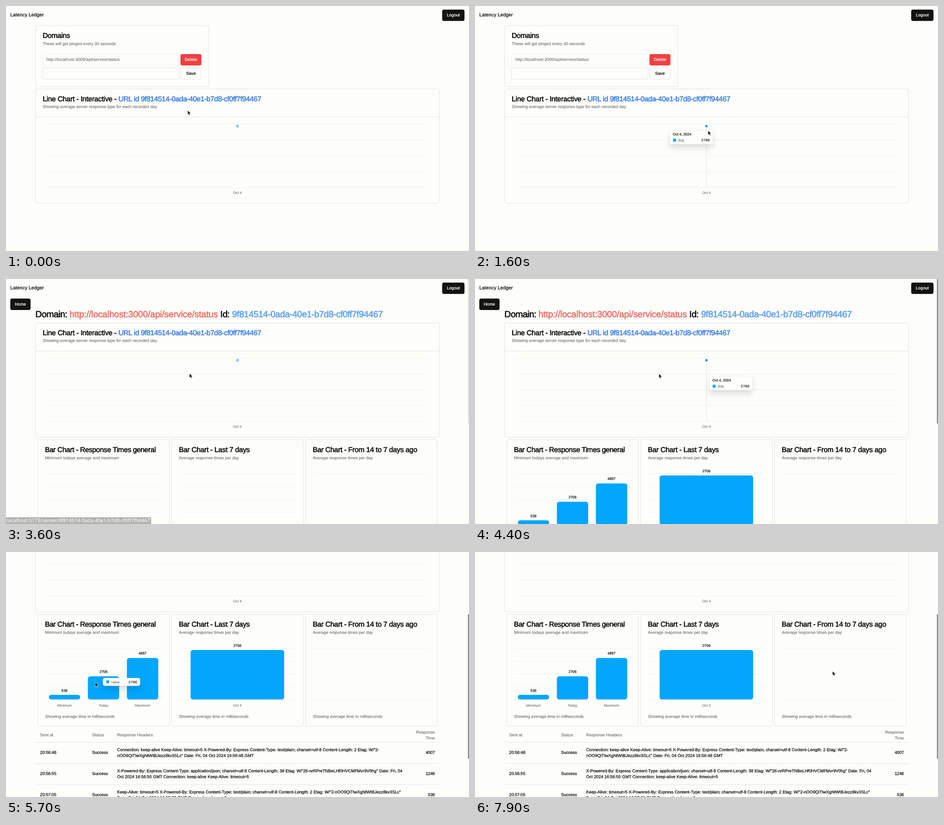
An HTML page for the animation above (8000 ms loop, 1027 by 545 pixels).

```html
<!DOCTYPE html>
<html lang="en">
<head>
<meta charset="utf-8">
<title>Latency Ledger</title>
<style>
  html, body { margin: 0; width: 100%; height: 100%; overflow: hidden; background: #fdfdf9; }
  svg { display: block; width: 1027px; height: 545px; }
  text { font-family: "Liberation Sans", Arial, sans-serif; white-space: pre; text-rendering: geometricPrecision; }
  .mono { font-family: "Liberation Mono", monospace; }
  .status { font-family: "Noto Sans", "Open Sans", sans-serif; }
  .tip { filter: drop-shadow(0 8px 7px rgba(0, 0, 0, .13)); }
</style>
</head>
<body>
<svg id="stage" viewBox="0 0 1027 545"></svg>
<script>
const LOOP = 8000, STEP = 100;
const INK = '#0d0d0c', MUTED = '#70706c', EDGE = '#e3e3e5', GRID = '#f1f1ef';
const BLUE = '#02a6fd', LINK = '#3b80e9', PAPER = '#fdfdf9';
const ID = '9f814514-0ada-40e1-b7d8-cf0ff7f94467';
const ADDRESS = 'http://localhost:3000/api/service/status';
const SCROLL_END = 219, BASE = 547;

// Markup helpers
const text = (x, y, str, { size = 9.28, fill = INK, bold = .3, gap = 0, anchor = 'start', cls = '' } = {}) =>
  `<text class="${cls}" x="${x}" y="${y}" font-size="${size}" fill="${fill}" stroke="${fill}" stroke-width="${bold}" ` +
  `letter-spacing="${gap}" text-anchor="${anchor}">${str}</text>`;
const muted = (x, y, str, o = {}) => text(x, y, str, { fill: MUTED, bold: .15, ...o });
const title = (x, y, str, gap, fill = INK) => text(x, y, str, { size: 15.9, bold: .62, gap, fill });
const small = (x, y, str, o = {}) => text(x, y, str, { size: 7.96, bold: .22, anchor: 'middle', ...o });
const box = (x, y, w, h, fill = PAPER, stroke = EDGE, r = 4) =>
  `<rect x="${x}" y="${y}" width="${w}" height="${h}" rx="${r}" fill="${fill}" stroke="${stroke}"/>`;
const rule = (x1, x2, y, color = GRID) => `<path d="M${x1} ${y}H${x2}" stroke="${color}"/>`;
const rules = (n, x1, x2, y, gap) =>
  Array.from({ length: n }, (_, i) => rule(x1, x2, Math.floor(y + i * gap) + .5)).join('');
const button = (x, y, w, h, str, fill = PAPER, color = INK) =>
  box(x, y, w, h, fill, fill === PAPER ? EDGE : 'none') +
  text(x + w / 2, y + h / 2 + 2.4, str, { fill: color, anchor: 'middle', gap: .1 });

const lineChart = (id, top) => box(65.5, top, 896, 254) + rule(65.5, 961.5, top + 62.5, EDGE) +
  title(81.4, top + 27.3, 'Line Chart - Interactive - ', -.26) +
  title(249.4, top + 27.3, 'URL id ' + ID, -.38, LINK) +
  muted(81.5, top + 42, 'Showing average server response type for each recorded day.') +
  rules(5, 89, 938, top + 78, 35.2) +
  `<path id="${id}Rule" d="M513.5 ${top + 78}v140.5" stroke="#e2e2e0"/>` +
  `<circle id="${id}Dot" cx="513.5" cy="${top + 82.7}" r="2.1" stroke="#0d9ff0" stroke-width="1.2"/>` +
  small(513.3, top + 233, 'Oct 4', { fill: MUTED, bold: .12 });

const barCard = (x, name, gap, note, lines) => box(x, 357.5, 292, 249) + title(x + 15.9, 384.8, name, gap) +
  muted(x + 16, 400.6, note) + rules(lines, x + 16, x + 276, 433, 114 / (lines - 1)) +
  muted(x + 16, 588, 'Showing average time in milliseconds');

const general = [['Minimum', 536], ['Today', 2706], ['Maximum', 4857]];
const bars = general.map(([name, value], i) => ({ x: 95 + i * 86.6, w: 69.5, h: value * .019, value, name }));
bars.push({ x: 409.5, w: 207.5, h: 110, value: 2706, name: 'Oct 4' });

const rows = [
  ['20:56:48', 4007, 'Connection: keep-alive Keep-Alive: timeout=5 X-Powered-By: Express Content-Type: text/plain; charset=utf-8 Content-Length: 2 Etag: W/"2-',
    'nOO9QiTIwXgNtWtBJezz8kv3SLc" Date: Fri, 04 Oct 2024 16:56:48 GMT'],
  ['20:56:55', 1246, 'X-Powered-By: Express Content-Type: application/json; charset=utf-8 Content-Length: 38 Etag: W/"26-nrRPreTNBeLHf0HVCMFMvr9V0hg" Date: Fri, 04',
    'Oct 2024 16:56:55 GMT Connection: keep-alive Keep-Alive: timeout=5'],
  ['20:57:05', 536, 'Keep-Alive: timeout=5 X-Powered-By: Express Content-Type: text/plain; charset=utf-8 Content-Length: 2 Etag: W/"2-nOO9QiTIwXgNtWtBJezz8kv3SLc"',
    'Date: Fri, 04 Oct 2024 16:57:05 GMT Connection: keep-alive']
];

function table() {
  const end = { anchor: 'end' }, o = { gap: .045 };
  return muted(75.5, 629.2, 'Sent at') + muted(191, 629.2, 'Status') + muted(246.5, 629.2, 'Response Headers') +
    muted(951.5, 622.8, 'Response', end) + muted(951.5, 635.8, 'Time', end) + rule(65.5, 961.5, 642.5, EDGE) +
    rows.map(([time, ms, a, b], i) => {
      const y = 668.2 + i * 46.8;
      return text(75.5, y, time) + text(191, y, 'Success') + text(246.5, y - 6.2, a, o) +
        text(246.5, y + 6.7, b, o) + text(951.5, y, ms, end) + rule(65.5, 961.5, Math.round(y + 20.8) + .5, EDGE);
    }).join('');
}

const header = text(9.5, 23.1, 'Latency Ledger', { size: 10.6, gap: .1 }) +
  button(967.5, 8, 49.5, 25.2, 'Logout', '#131312', '#f7f7f4');

const home = header + box(65.5, 43.5, 384, 136) + title(81.4, 71.2, 'Domains', -.3) +
  muted(81.5, 87.1, 'These will get pinged every 30 seconds') +
  box(81.5, 106.5, 302.5, 26, PAPER, '#f2f2f0') + muted(89.5, 121.6, ADDRESS, { gap: .14 }) +
  button(387, 107, 46.5, 25.3, 'Delete', '#ee4141', '#fdf6f4') +
  box(81.5, 137.5, 302.5, 25.5) + button(387.5, 137.5, 45.5, 25.5, 'Save') +
  lineChart('a', 184.5) + `<g id="underline">${rule(249.5, 567, 213.5, LINK)}</g>`;

const big = (x, str, gap, fill = INK) => text(x, 85, str, { size: 19.9, bold: .7, gap, fill });
const perDay = 'Average response times per day';
const detail = header + button(9.5, 43.5, 45, 25.5, 'Home', '#131312', '#f7f7f4') +
  big(65.3, 'Domain:', -.5) + big(140.7, ADDRESS, -.2, '#ef6f68') +
  big(475.3, 'Id:', -.4) + big(501.5, ID, -.48, '#5d9ff2') +
  lineChart('b', 98) +
  barCard(70.5, 'Bar Chart - Response Times general', -.36, 'Minimum todays average and maximum', 5) +
  barCard(367.5, 'Bar Chart - Last 7 days', -.26, perDay, 5) +
  barCard(664.5, 'Bar Chart - From 14 to 7 days ago', -.29, perDay, 2) +
  bars.map(b => `<rect class="bar" x="${b.x}" width="${b.w}" rx="5.2" fill="${BLUE}"/>` +
    small(b.x + b.w / 2, 563.3, b.name, { fill: MUTED, bold: .12 })).join('') +
  '<g id="barLabels">' + bars.map(b => small(b.x + b.w / 2, BASE - b.h - 7.3, b.value)).join('') + '</g>' +
  table();

const tipBox = (w, h) => `<rect class="tip" width="${w}" height="${h}" rx="4" fill="#fefefc" stroke="#eeeeec" stroke-width=".7"/>`;
const tipRow = (y, label, end, id) => `<rect x="7" y="${y - 6}" width="6.5" height="6.5" rx="1" fill="${BLUE}"/>` +
  muted(18.3, y, label, { size: 7.96 }) +
  `<g id="${id}">` + text(end, y, 2706, { size: 7.96, bold: .15, anchor: 'end', cls: 'mono' }) + '</g>';

const stage = document.getElementById('stage');
stage.innerHTML = `<rect width="1027" height="545" fill="${PAPER}"/>
  <g id="home">${home}</g>
  <g id="detail">${detail}</g>
  <rect id="thumb" x="1024.6" width="2.4" height="321.5" rx="1"/>
  <g id="lineTip">${tipBox(95, 30)}${text(6.4, 11, 'Oct 4, 2024', { size: 7.96, bold: .22 })}${tipRow(24.2, 'avg', 88.5, 'lineValue')}</g>
  <g id="barTip">${tipBox(82, 17)}${tipRow(11.2, 'value', 75.5, 'barValue')}</g>
  <g id="status"><path d="M0 530H319Q322 530 322 533V545H0Z" fill="#b3b3b0"/>${text(1.5, 541.3, 'localhost:5173/server/' + ID, { size: 11, fill: '#fff', bold: 0, cls: 'status' })}</g>
  <g id="cursor">
    <path id="arrow" d="M0 0V9.8L2.2 7.8L3.8 11.3L5.4 10.6L3.9 7.2H7Z" fill="#0a0a0a" stroke="#fff" stroke-width=".7"/>
    <path id="beam" d="M-2 -4Q0 -4 0 -3Q0 -4 2 -4M0 -3V3M-2 4Q0 4 0 3Q0 4 2 4" fill="none" stroke="#222" stroke-width=".9"/>
    <path id="hand" d="M0 0Q1.3 -.6 1.9 .4V4L6.4 5Q7.6 5.4 7.4 6.8L6.6 11H1.2L-2.2 7Q-2.2 5.6 -.2 6.6Z" fill="#0a0a0a" stroke="#fff" stroke-width=".7"/>
  </g>`;

const $ = id => document.getElementById(id);
const show = (id, on) => { $(id).style.display = on ? '' : 'none'; };
const move = (id, x, y) => $(id).setAttribute('transform', `translate(${x} ${y})`);
const within = (v, a, b) => v >= a && v < b;
const progress = (t, start, length) => Math.min(1, Math.max(0, (t - start) / length));

// Pointer stops: time, x, y
const stops = [[0, 403, 232], [1300, 470, 245], [1400, 512, 273], [1600, 517, 277], [2600, 515, 284], [2900, 412, 210],
  [3600, 407, 210], [5300, 409, 211], [5400, 335, 258], [5600, 270, 283], [5700, 198, 290], [6200, 135, 298],
  [7000, 330, 276], [7900, 793, 265]];

function pointer(t) {
  const i = stops.findIndex(s => s[0] > t);
  if (i < 1) return stops[i ? stops.length - 1 : 0].slice(1);
  const [t0, x0, y0] = stops[i - 1], [t1, x1, y1] = stops[i];
  const k = (t - t0) / (t1 - t0);
  return [x0 + (x1 - x0) * k, y0 + (y1 - y0) * k];
}

// Plot areas that react to the pointer while they are on screen
const plot = (name, from, to, x, y, w, h) => ({ name, from, to, x, y, w, h });
const plots = [
  plot('a', 0, 3600, 81, 262, 857, 141), plot('b', 3900, 4500, 81, 176, 857, 141),
  plot('general', 5000, LOOP, 86, 214, 261, 114), plot('week', 5000, LOOP, 384, 214, 260, 114)
];

function hover(t) {
  const [x, y] = pointer(t);
  return plots.find(p => within(t, p.from, p.to) && within(x, p.x, p.x + p.w) && within(y, p.y, p.y + p.h));
}

const barAt = (p, x) => p.name === 'week' ? bars[3] : bars[Math.floor((x - p.x) / p.w * 3)];

// Where the tooltip wants to be: beside the data point, flipped at the right edge
function tipGoal(p, t) {
  if (hover(t) !== p) return [p.x, p.y];
  const [x, y] = pointer(t);
  if (p.name.length === 1) return [520.2, y + 6.6];
  const b = barAt(p, x), mid = b.x + b.w / 2;
  return [mid + 89 > p.x + p.w ? mid - 88.6 : mid + 6.6, y + 6.6];
}

// The tooltip trails its goal with an eased lag
const lag = [.1, .31, .39, .2];
const tipPlace = (p, t) => lag.reduce(([x, y], weight, i) => {
  const goal = tipGoal(p, t - i * 100);
  return [x + goal[0] * weight, y + goal[1] * weight];
}, [0, 0]);

function draw(t) {
  const second = t >= 3600;
  const [x, y] = pointer(t);
  const over = hover(t), name = over ? over.name : '';

  show('home', !second);
  show('detail', second);
  show('thumb', second);
  const scroll = SCROLL_END * (1 - (1 - progress(t, 4400, 600)) ** 2.05);
  move('detail', 0, -scroll);
  $('thumb').setAttribute('y', scroll * .632);
  $('thumb').setAttribute('fill', t < 3800 ? '#e4e4e2' : '#858583');

  for (const id of ['a', 'b']) {
    show(id + 'Rule', name === id);
    $(id + 'Dot').setAttribute('fill', name === id ? '#0d9ff0' : PAPER);
  }
  show('lineTip', name.length === 1);
  show('barTip', name.length > 1);
  if (over) move(name.length === 1 ? 'lineTip' : 'barTip', ...tipPlace(over, t));
  if (name.length > 1) $('barValue').firstChild.textContent = barAt(over, x).value;

  const p = progress(t, 3700, 400), grow = 1 - (1 - p) ** 3;
  document.querySelectorAll('.bar').forEach((el, i) => {
    el.setAttribute('y', BASE - bars[i].h * grow);
    el.setAttribute('height', bars[i].h * grow);
  });
  show('barLabels', p === 1);

  const hand = within(t, 2900, 3600), beam = within(t, 4800, 4900);
  show('underline', hand);
  show('status', within(t, 3100, 3800));
  move('cursor', x, y);
  show('hand', hand);
  show('beam', beam);
  show('arrow', !hand && !beam);
}

function tick(now) {
  draw(Math.floor(now % LOOP / STEP) * STEP);
  requestAnimationFrame(tick);
}
draw(0);
requestAnimationFrame(tick);
</script>
</body>
</html>
```
